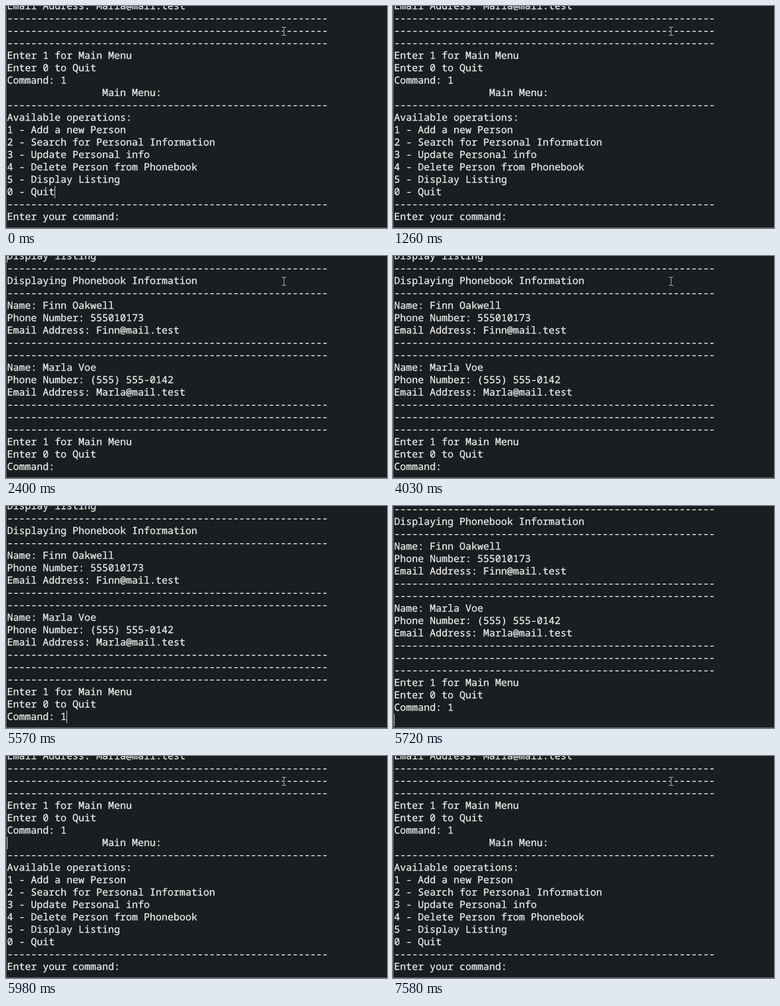
An HTML page with a canvas for the animation above (8 s loop, 705 by 412 pixels).

```html
<!DOCTYPE html>
<html lang="en">
<head>
<meta charset="utf-8">
<title>Phonebook console</title>
<style>
  html, body { margin: 0; width: 100%; height: 100%; overflow: hidden; background: #1a1e20; }
  #stage { position: relative; width: 705px; height: 412px; overflow: hidden; background: #1a1e20; }
  #log {
    position: absolute; left: 2px; top: 0; margin: 0; white-space: pre; color: #e6e6e6;
    font: 18.3333px/23px "Noto Sans Mono", monospace;
    text-rendering: geometricPrecision;
    -webkit-text-stroke: 0.4px #e6e6e6;
  }
  #caret { position: absolute; width: 1px; height: 23px; background: #e6e6e6; }
  #edge {
    position: absolute; inset: 0; box-sizing: border-box;
    border-left: 1px solid #747779; border-bottom: 1px solid #747779;
  }
  #mouse { position: absolute; left: 510px; top: 39px; }
</style>
</head>
<body>
<div id="stage">
  <pre id="log"></pre>
  <div id="caret"></div>
  <div id="edge"></div>
  <canvas id="mouse" width="9" height="16"></canvas>
</div>
<script>
const LOOP = 8000, ROW = 23, COL = 11, LEFT = 2;
const rule = "-".repeat(54);
const $ = id => document.getElementById(id);
const log = $("log"), caret = $("caret"), mouse = $("mouse");

const person = (name, phone, email) => [
  "Name: " + name, "Phone Number: " + phone, "Email Address: " + email, rule
];

const listing = [
  "Display listing", rule, "Displaying Phonebook Information", rule,
  ...person("Finn Oakwell", "555010173", "Finn@mail.test"), rule,
  ...person("Marla Voe", "(555) 555-0142", "Marla@mail.test"), rule, rule,
  "Enter 1 for Main Menu", "Enter 0 to Quit", "Command: "
];
const title = " ".repeat(16) + "Main Menu:";
const menu = [
  title, rule, "Available operations:",
  "1 - Add a new Person", "2 - Search for Personal Information",
  "3 - Update Personal info", "4 - Delete Person from Phonebook",
  "5 - Display Listing", "0 - Quit", rule, "Enter your command: "
];

const listed = listing.join("\n");
const chosen = listed + "1\n";
const full = chosen + menu.join("\n");
const menuTop = -11 - 11 * ROW;

// col, y: caret column and top; blinks: times at which it toggles
const scenes = [
  { at: 0, text: full, top: menuTop, col: 8, y: 334, mouse: true, blinks: [270, 700, 1260, 1820] },
  { at: 2250, text: full + "5", top: menuTop, col: 21, y: 380 },
  { at: 2400, text: listed, top: -11, col: 0, y: -11, mouse: true, blinks: [2940, 3500, 4030, 4580, 5010] },
  { at: 5570, text: listed + "1", top: -11, col: 10, y: 380 },
  { at: 5720, text: chosen, top: -28, col: 0, y: 386 },
  { at: 5860, text: chosen + title, top: -34, col: 0, y: 380, mouse: true },
  { at: 5980, text: full, top: menuTop, col: 0, y: 150, mouse: true, blinks: [6490, 7050, 7580] }
];

function drawMouse() {
  const g = mouse.getContext("2d");
  g.fillStyle = "#101314";
  g.fillRect(3, 1, 3, 14);
  g.fillStyle = "#dcdcdc";
  g.fillRect(4, 1, 1, 14);
  for (const y of [0, 15]) {
    g.fillRect(1, y, 3, 1);
    g.fillRect(5, y, 3, 1);
  }
  // soft rim on the serifs
  g.fillStyle = "rgba(220, 220, 220, 0.45)";
  for (const y of [0, 15]) g.fillRect(0, y, 9, 1);
}

let current = null;
function show(scene) {
  if (scene === current) return;
  current = scene;
  log.textContent = scene.text;
  // one pixel up puts the baseline 18px below the row top
  log.style.top = scene.top - 1 + "px";
  caret.style.left = LEFT + scene.col * COL + "px";
  caret.style.top = scene.y + "px";
  mouse.style.visibility = scene.mouse ? "visible" : "hidden";
}

const start = performance.now();
function tick(now) {
  const t = Math.max(0, now - start) % LOOP;
  const scene = scenes.filter(s => s.at <= t).pop();
  show(scene);
  const flips = (scene.blinks || []).filter(b => b <= t).length;
  caret.style.visibility = flips % 2 ? "hidden" : "visible";
  requestAnimationFrame(tick);
}

drawMouse();
tick(start);
</script>
</body>
</html>
```
